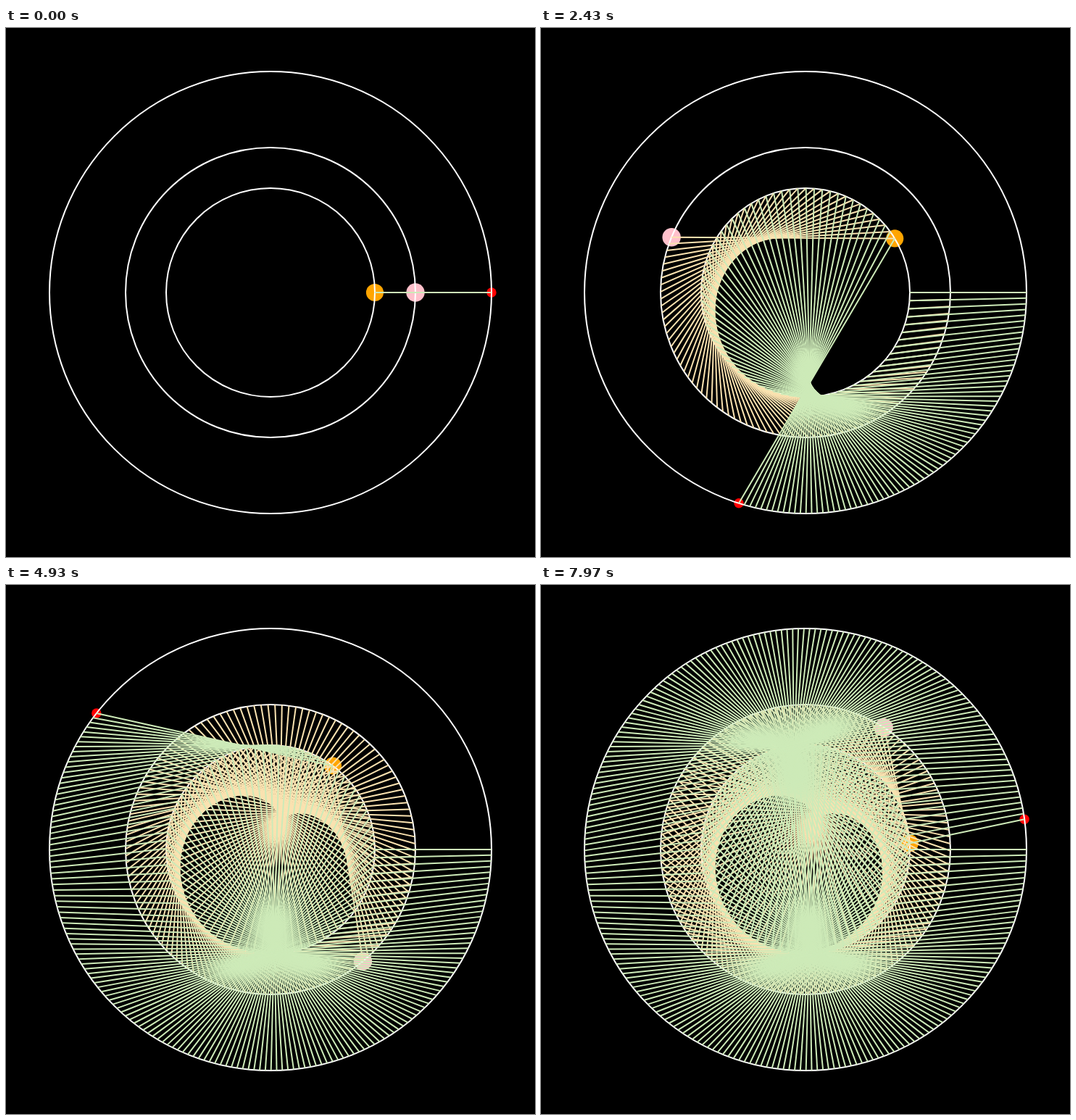
An HTML page with a canvas for the animation above (8 s loop, 730 by 730 pixels).

```html
<!DOCTYPE html>
<html lang="en">
<head>
<meta charset="utf-8">
<title>Orbit dance</title>
<style>
  html, body { margin: 0; width: 100%; height: 100%; overflow: hidden; background: #000; }
  canvas { display: block; width: 730px; height: 730px; }
</style>
</head>
<body>
<canvas id="stage" width="730" height="730"></canvas>
<script>
const ctx = document.getElementById('stage').getContext('2d');
const LOOP = 8000, CENTER = 365, TURN = 2 * Math.PI;

// Orbital speed in radians per step, from the period in days.
const speed = days => 12.5 * TURN * 224.7 / days / 999;

const pink = { orbit: 200, size: 12.7, color: '#ffc0cb', speed: speed(365) };
const orange = { orbit: 144, size: 12.1, color: '#ffa500', speed: speed(224.7) };
const red = { orbit: 305, size: 6.7, color: '#ff0000', speed: speed(687) };
const planets = [pink, orange, red];

const position = (planet, step) => [
  CENTER + planet.orbit * Math.cos(planet.speed * step),
  CENTER + planet.orbit * Math.sin(planet.speed * step)
];

function circle([x, y], radius) {
  ctx.beginPath();
  ctx.arc(x, y, radius, 0, TURN);
}

function connect(a, b, color, lastStep) {
  ctx.strokeStyle = color;
  for (let step = 0; step <= lastStep; step++) {
    ctx.beginPath();
    ctx.moveTo(...position(a, step));
    ctx.lineTo(...position(b, step));
    ctx.stroke();
  }
}

function draw(step) {
  ctx.fillStyle = '#000';
  ctx.fillRect(0, 0, 730, 730);
  ctx.lineWidth = 2;
  for (const planet of planets) {
    ctx.fillStyle = planet.color;
    circle(position(planet, step), planet.size);
    ctx.fill();
  }
  ctx.strokeStyle = '#fff';
  for (const planet of planets) {
    circle([CENTER, CENTER], planet.orbit);
    ctx.stroke();
  }
  connect(pink, orange, '#fae2b0', step);
  connect(orange, red, '#cdeab8', step);
}

// 30 steps per second, with step times rounded to 10 ms.
const stepAt = ms => Math.floor((Math.floor(ms / 10) * 10 + 3.4) * 0.03);

const start = performance.now();
let shown = -1;

function tick() {
  const step = stepAt((performance.now() - start) % LOOP);
  if (step !== shown) draw(shown = step);
  requestAnimationFrame(tick);
}
tick();
</script>
</body>
</html>
```
